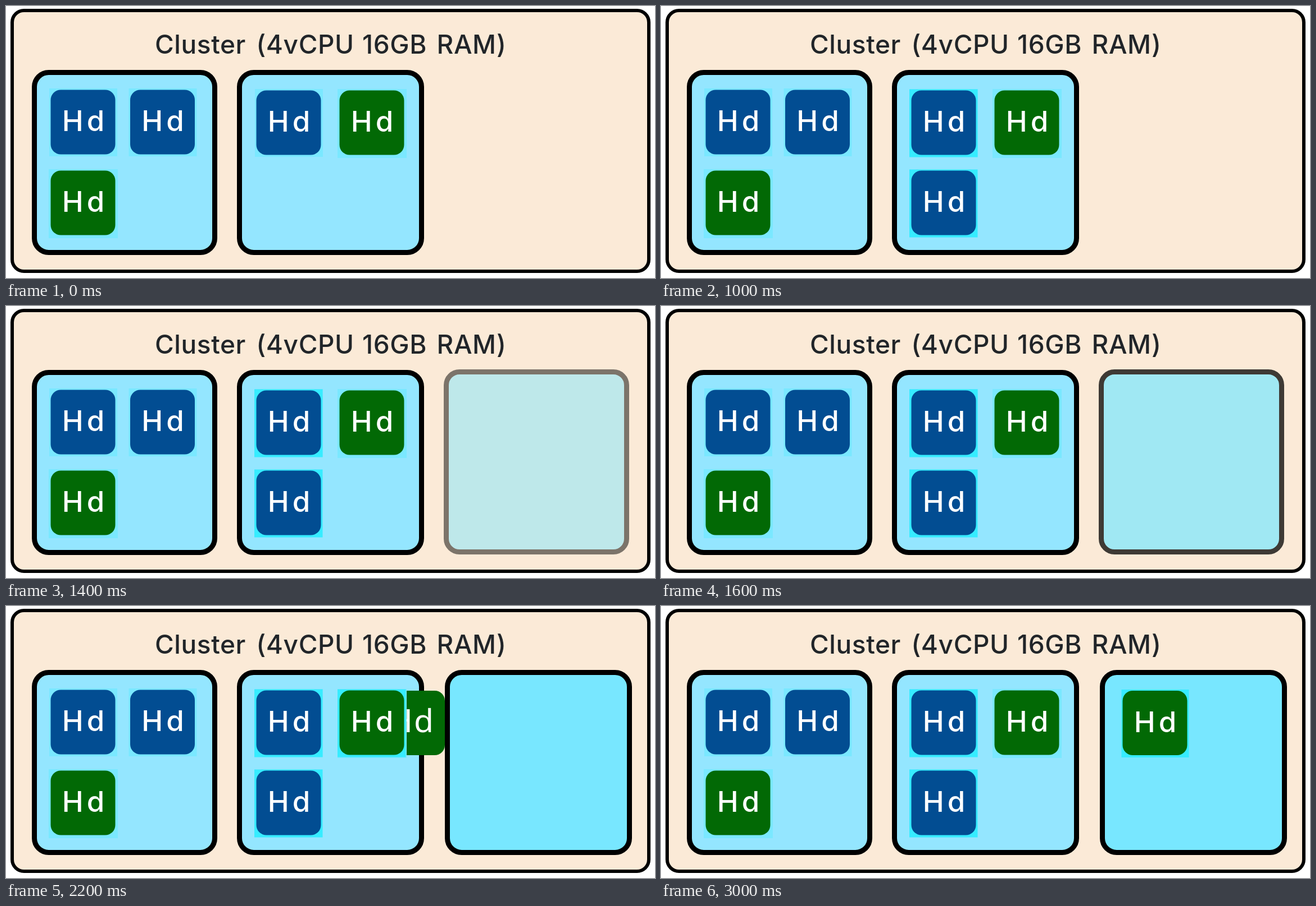
Animation, 1155 px wide and 485 px high, one loop 3200 ms. Source, as an HTML page:

```html
<!DOCTYPE html>
<html lang="en">
<head>
<meta charset="utf-8">
<title>Cluster scaling</title>
<style>
  html, body { margin: 0; width: 100%; height: 100%; overflow: hidden; background: #fff; }
  svg { display: block; width: 1155px; height: 485px; }
  text { font-family: Inter, "Open Sans", sans-serif; font-weight: 500; text-anchor: middle; }
  .title { font-size: 46px; letter-spacing: .6px; fill: #212529; }
  .label { font-size: 51px; letter-spacing: 6px; fill: #fff; }
  .moving .label { font-family: "Noto Sans", "Open Sans", sans-serif; font-size: 57px; letter-spacing: 2px; }
</style>
</head>
<body>
<svg id="stage" viewBox="0 0 1155 485" xmlns="http://www.w3.org/2000/svg"></svg>
<script>
const NS = 'http://www.w3.org/2000/svg';
const stage = document.getElementById('stage');
const BLUE = '#024d92', GREEN = '#026905', DIM = '#7ae8ff', BRIGHT = '#36ecff';
const STEP = 200, LOOP = 3200, SIZE = 115;

function add(parent, name, attrs, text) {
  const el = document.createElementNS(NS, name);
  for (const key in attrs) el.setAttribute(key, attrs[key]);
  if (text) el.textContent = text;
  return parent.appendChild(el);
}

function rect(parent, x, y, width, height, fill, rx = 0) {
  return add(parent, 'rect', { x, y, width, height, fill, rx });
}

// Outer bounds with the border drawn inside them.
function panel(x, y, w, h, border, radius, fill) {
  const el = rect(stage, x + border / 2, y + border / 2, w - border, h - border, fill, radius - border / 2);
  el.setAttribute('stroke', '#000');
  el.setAttribute('stroke-width', border);
  return el;
}

// A tile in its own group; halo is [left, top, width, height] relative to the tile.
function tile(x, y, color, halo, haloColor, textX = 61, textY = 73.5) {
  const g = add(stage, 'g', { transform: `translate(${x} ${y})` });
  if (halo) rect(g, ...halo, haloColor);
  rect(g, 0, 0, SIZE, SIZE, color, 18);
  add(g, 'text', { x: textX, y: textY, class: 'label' }, 'Hd');
  return g;
}

panel(8, 5, 1139, 471, 6, 24, '#fbead7');
const title = add(stage, 'text', { y: 85, class: 'title' });
[['Cluster', 346], ['(4vCPU', 532.5], ['16GB', 691.5], ['RAM)', 828.5]]
  .forEach(([word, x]) => add(title, 'tspan', { x }, word));

panel(46, 114, 330, 330, 9, 30, '#94e6ff');
panel(411, 114, 333, 330, 9, 30, '#94e6ff');
const fading = panel(779, 113, 330, 330, 9, 28, '#82e8fd');
const third = panel(781, 114, 333, 330, 9, 30, '#78e7ff');

const halo = [-2.5, -2.5, 121, 121];
const wide = [-3.5, -2.5, 123, 123];
const lit = [-3.5, -2, 121.5, 121];

tile(79.5, 149.5, BLUE, halo, DIM);
tile(221, 149.5, BLUE, halo, DIM);
tile(79.5, 293.5, GREEN, wide, DIM);

const blueDrop = tile(445.5, 150.5, BLUE, halo, DIM);
const blueLanded = tile(445.5, 293.5, BLUE, lit, BRIGHT);
tile(445.5, 150.5, BLUE, halo, DIM);
const blueLit = tile(445.5, 150.5, BLUE, lit, BRIGHT);

const greenSlide = tile(593.5, 151, GREEN, null, '', 56.5, 74);
greenSlide.setAttribute('class', 'moving');
tile(593.5, 150.5, GREEN, wide, DIM);
const greenLit = tile(593.5, 150.5, GREEN, lit, BRIGHT);
const greenLanded = tile(821.5, 151, GREEN, [-2, -2, 120, 121], BRIGHT);

// Positions per step of the two moving tiles.
const dropY = [150.5, 172, 205, 235, 264];
const slideX = [625, 666, 699, 733, 782];

function show(el, on) {
  el.setAttribute('visibility', on ? 'visible' : 'hidden');
}

function draw(time) {
  const i = Math.floor((time % LOOP) / STEP);
  const slide = i - 10;
  const sliding = slide >= 0 && slide < slideX.length;

  show(blueDrop, i < dropY.length);
  if (i < dropY.length) blueDrop.setAttribute('transform', `translate(445.5 ${dropY[i]})`);
  show(blueLanded, i >= 5);
  show(blueLit, i >= 5);

  show(fading, i > 5 && i < 9);
  fading.setAttribute('opacity', (i - 5) / 4);
  show(third, i >= 9);

  show(greenSlide, sliding);
  show(greenLit, sliding);
  if (sliding) greenSlide.setAttribute('transform', `translate(${slideX[slide]} 151)`);
  show(greenLanded, i >= 15);
}

const start = performance.now();
function tick() {
  draw(performance.now() - start);
  requestAnimationFrame(tick);
}
tick();
</script>
</body>
</html>
```
